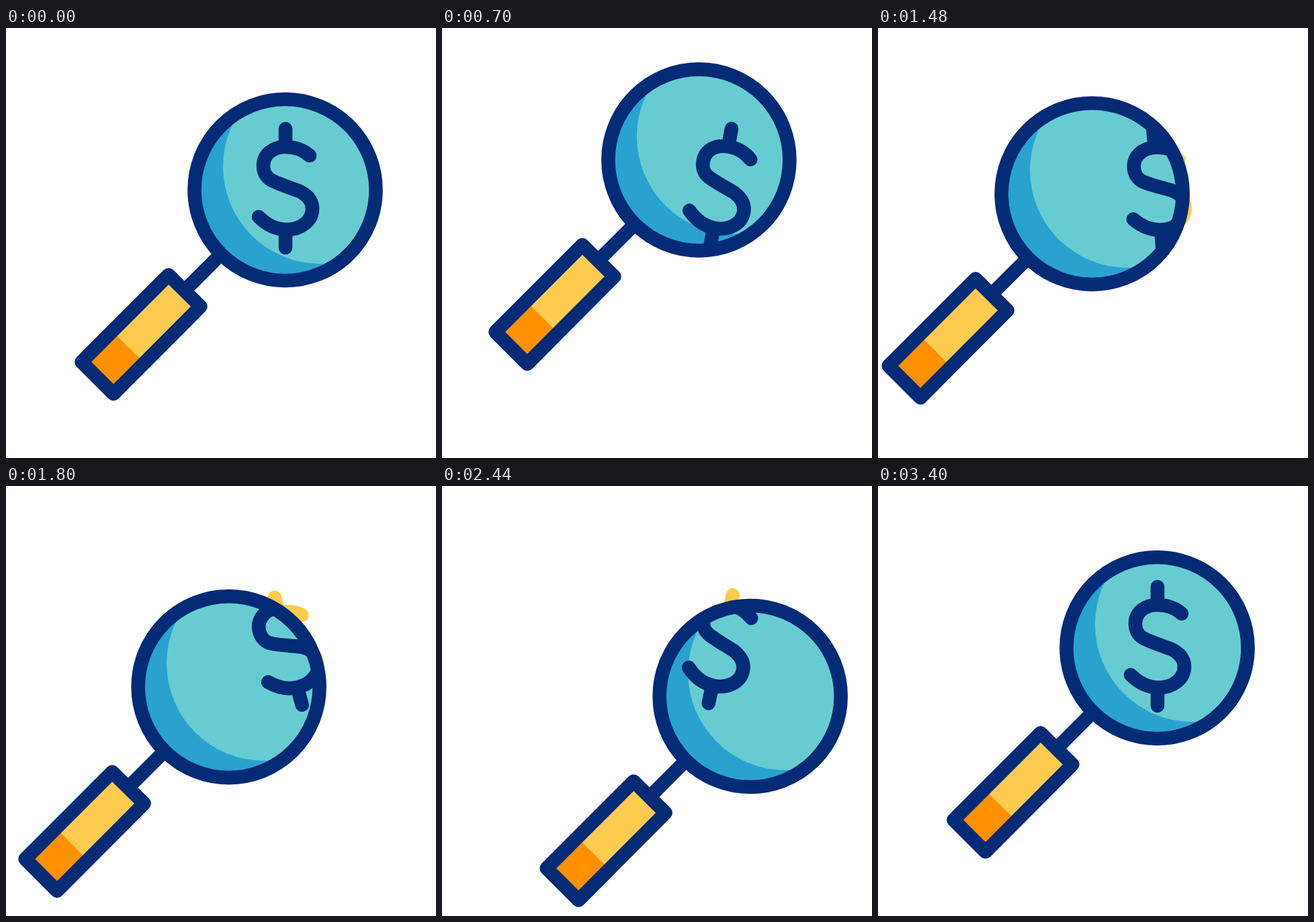
Recreate the animation shown at these times as an HTML page. Size 640 px wide and 640 px high, loop 3620 ms.

```html
<!DOCTYPE html>
<html>
<head>
<meta charset="utf-8">
<style>
html, body { margin: 0; height: 100%; overflow: hidden; background: #fff; }
svg { display: block; width: 100%; height: 100%; }
.line { fill: none; stroke: #042b76; stroke-width: 20.6; stroke-linecap: round; stroke-linejoin: round; }
.coin { stroke: #fdcb50; stroke-width: 22.8; }
</style>
</head>
<body>
<svg viewBox="0 0 640 640">
  <defs>
    <path id="dollar" d="M452 190C442 181 429 177 416 177C397 177 383 188 383 205C383 214 387 222 394 226C405 232 424 238 437 243C449 249 456 258 456 269C456 287 439 300 418 300C402 300 387 292 376 281M416 150V177M416 300V327"/>
    <clipPath id="inner"><circle cx="415.5" cy="241" r="130"/></clipPath>
    <clipPath id="glass"><circle class="lens" cx="415.5" cy="241" r="130"/></clipPath>
  </defs>
  <g class="swing"><use href="#dollar" class="line coin" transform="translate(43.6 26.9) scale(.9)"/></g>
  <g class="lens">
    <path class="line" d="M320 336.5L268 388.5"/>
    <path fill="#fdcb50" d="M242 367.5L289.5 414.5L160 544.5L112.5 497Z"/>
    <path fill="#ff9000" d="M158.2 451.2L205.6 498.6L160 544.5L112.5 497Z"/>
    <path class="line" d="M242 367.5L289.5 414.5L160 544.5L112.5 497Z"/>
    <circle cx="415.5" cy="241" r="130" fill="#29a2cf"/>
    <circle cx="468" cy="206" r="145" fill="#67ccd1" clip-path="url(#inner)"/>
  </g>
  <g clip-path="url(#glass)"><g class="swing"><use href="#dollar" class="line"/></g></g>
  <g class="lens"><circle class="line" cx="415.5" cy="241" r="135"/></g>
</svg>
<script>
const LOOP = 3620, START = 200, END = 3400, SWING = 15;
const HOME = { x: 415.5, y: 241 };

// Places the lens passes through; a smooth curve joins them
const stops = [
  { t: START, ...HOME },
  { t: 700, x: 382.5, y: 196.5 },
  { t: 930, x: 353.5, y: 163 },
  { t: 1160, x: 332.5, y: 189 },
  { t: 1800, x: 331.5, y: 299 },
  { t: 2440, x: 458.5, y: 313 },
  { t: 2660, x: 491, y: 296.5 },
  { t: 2980, x: 448.5, y: 264.5 },
  { t: END, ...HOME }
];

const smooth = u => u * u * (3 - 2 * u);
const mix = (a, b, u) => a + (b - a) * u;
const slope = (a, b, k) => (b[k] - a[k]) / (b.t - a.t);

// Speed at a stop: weighted mean of both sides, at rest at the ends
function speed(i, k) {
  const a = stops[i - 1], b = stops[i], c = stops[i + 1];
  return a && c ? mix(slope(a, b, k), slope(b, c, k), (b.t - a.t) / (c.t - a.t)) : 0;
}

function lensAt(t, k) {
  const i = Math.max(1, stops.findIndex(s => t <= s.t));
  const a = stops[i - 1], b = stops[i], span = b.t - a.t, u = (t - a.t) / span;
  const bend = speed(i - 1, k) * (1 - u) - speed(i, k) * u;
  return mix(a[k], b[k], smooth(u)) + span * u * (1 - u) * bend;
}

// Four equal swings: rest, right, left, right, rest
function angleAt(t) {
  const p = (t - START) / (END - START) * 4;
  const q = p < 2 ? p : 4 - p;
  return SWING * (q < 1 ? smooth(q) : 1 - 2 * smooth(q - 1));
}

function place(name, transform) {
  document.querySelectorAll(name).forEach(e => e.setAttribute('transform', transform));
}

function draw(now) {
  const t = Math.min(END, Math.max(START, now % LOOP));
  place('.lens', `translate(${lensAt(t, 'x') - HOME.x} ${lensAt(t, 'y') - HOME.y})`);
  place('.swing', `rotate(${angleAt(t)} 424 233)`);
}

const begin = performance.now();
function tick() {
  draw(performance.now() - begin);
  requestAnimationFrame(tick);
}
tick();
</script>
</body>
</html>
```
